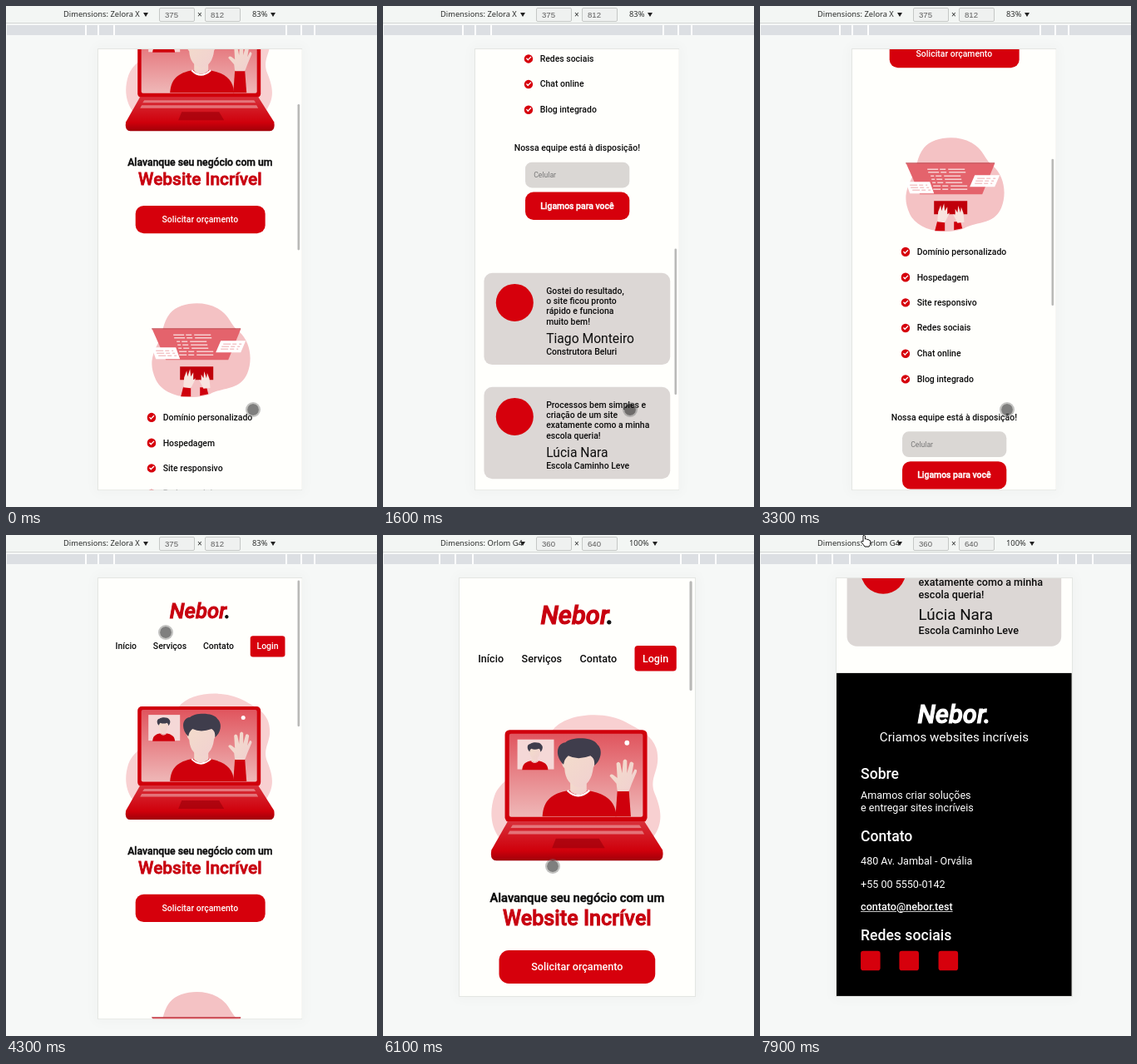
Write an HTML page that moves like this. It is 446 by 602 pixels and loops after 8 s.

```html
<!DOCTYPE html>
<html lang="pt">
<head>
<meta charset="utf-8">
<title>Nebor</title>
<style>
html, body { margin: 0; width: 100%; height: 100%; overflow: hidden; }
body { --red: #d6000c; --w: 375px; --vh: 811px; --k: .6525; --x: 110.8px; --head: 0px; --mid: 0px; --low: 0px;
  position: relative; background: #f6f8f7; font-family: Roboto, sans-serif; }
body.small { --w: 360px; --vh: 639px; --k: .7855; --x: 92px; --head: -3px; --mid: -13px; --low: -20px; }
p { margin: 0; }

.bar { position: absolute; left: 0; top: 0; width: 100%; height: 20px; background: #f3f6f4; border-bottom: 1px solid #d3d6d4;
  font: 9.3px/20px "Noto Sans", sans-serif; color: #2b2d2c; }
.bar > * { position: absolute; white-space: nowrap; }
.bar i { top: 8px; border: 3px solid transparent; border-top: 5px solid #222; border-bottom: 0; }
.bar b { top: 2px; width: 35px; height: 15px; padding-left: 6px; border: 1px solid #c5c8c6; border-radius: 2px; background: #eff1f0;
  font: 9.6px/15px "Liberation Sans", sans-serif; color: #5c5c5c; box-sizing: content-box; }
.ruler { position: absolute; left: 1px; right: 0; top: 23px; height: 12px; background: #dcdfe3; }
.ruler i { position: absolute; top: 0; width: 1.6px; height: 12px; background: #fff; }

.phone { position: absolute; left: var(--x); top: 52px; width: var(--w); height: var(--vh); overflow: hidden;
  transform: scale(var(--k)); transform-origin: 0 0; background: #fffffc; }
.frame { position: absolute; left: calc(var(--x) - 1px); top: 51px; width: calc(var(--w) * var(--k)); height: calc(var(--vh) * var(--k));
  border: 1px solid #e4e6e3; box-shadow: 0 0 13px 4px rgba(0,0,0,.025); }
.page { position: absolute; left: 0; top: 0; width: 100%; height: calc(2421px + var(--low)); font-size: 16px; font-weight: 500; color: #0c0c0c; }
.page p { position: absolute; top: calc(var(--y) * 1px); transform: translateY(-50%); white-space: nowrap; line-height: 19px; }
.page svg { position: absolute; left: 0; width: 100%; display: block; }
.group { position: absolute; left: 0; width: 100%; }
.page .mid { left: 0; width: 100%; text-align: center; }
.heavy { -webkit-text-stroke: .036em; }
.logo { font: italic 500 39.5px Roboto, sans-serif; }
.nav { position: absolute; top: 105.5px; left: 1px; right: 1px; height: 39.5px; display: flex; justify-content: space-evenly; align-items: center; }
.nav b { width: 63.5px; line-height: 39.5px; border-radius: 5px; background: var(--red); color: #fff; font-weight: 500; text-align: center; }
.btn { position: absolute; left: 50%; transform: translateX(-50%); height: 51px; border-radius: 15px; background: var(--red); color: #fff;
  line-height: 51px; text-align: center; }
.list { position: absolute; left: calc(50% - 98px); }
.list p { left: 29.5px; }
.list p::before { content: ""; position: absolute; left: -29.5px; top: 1.5px; width: 16.5px; height: 16.5px; border-radius: 50%; background: var(--red); }
.list p::after { content: ""; position: absolute; left: -25px; top: 6px; width: 6.5px; height: 3px; border: solid #fff; border-width: 0 0 2px 2px; transform: rotate(-45deg); }
.field { position: absolute; top: 1303px; left: calc(50% - 96px); width: 176px; height: 47px; padding-left: 16px; border-radius: 12px;
  background: #dad7d4; color: #777; font: 13.3px/47px Roboto, sans-serif; }

.card { position: absolute; left: 16px; right: 16px; height: 169px; border-radius: 15px; background: #dcd7d5; }
.card::before { content: ""; position: absolute; left: 6.4%; top: 19.5px; width: 69px; height: 69px; border-radius: 50%; background: var(--red); }
.card p { left: 33.4%; }
.card .who { font-size: 24px; font-weight: 400; }
.foot { position: absolute; bottom: 0; width: 100%; height: 494px; background: #000; color: #fff; }
.foot p:not(.mid) { left: 37px; }
.foot .h { font-size: 22.4px; }
.foot .n { font-weight: 400; }
.foot i { position: absolute; top: 425px; width: 30px; height: 30px; background: var(--red); border-radius: 4px; }
.thumb { position: absolute; right: 4.5px; width: 3.4px; border-radius: 2px; background: rgba(128,128,128,.55); }

.menu { position: absolute; left: 64px; top: 18px; width: 140px; height: 331px; background: #fff; box-shadow: 0 0 0 .7px #bbb, 0 2px 4px rgba(0,0,0,.2);
  font: 9.3px/18.4px "Noto Sans", sans-serif; color: #2b2d2c; }
.menu div { padding-left: 8px; height: 18.4px; }
.menu .on { background: #dfe2e6; }
.cur { position: absolute; left: 0; top: 0; width: 0; height: 0; }
.cur > * { position: absolute; }
.dot { left: -9px; top: -9px; width: 14px; height: 14px; border: 2px solid rgba(120,120,120,.45); border-radius: 50%; background: rgba(0,0,0,.5); background-clip: padding-box; }
.cur svg { left: -7px; top: -4px; fill: #fff; stroke: #111; stroke-linejoin: round; }
</style>
</head>
<body>
<div class="bar">
  <span id="dev" style="left:69px"></span><i style="left:165px"></i>
  <b id="bw" style="left:184px"></b><span style="left:230px;font-size:10px">×</span><b id="bh" style="left:239px"></b>
  <span id="zoom" style="left:296px"></span><i id="za"></i>
</div>
<div class="ruler" id="ruler"></div>
<div class="frame"></div>

<div class="phone">
  <div class="page" id="page">
    <div class="group" style="top:var(--head)">
      <p class="mid logo heavy" style="--y:60;color:#c8000f">Nebor<span style="color:#111">.</span></p>
      <div class="nav"><span>Início</span><span>Serviços</span><span>Contato</span><b>Login</b></div>
      <svg style="top:204px" viewBox="110.8 185 244.7 160">
        <defs>
          <linearGradient id="scr" x2="0" y2="1"><stop stop-color="#e0555e"/><stop offset="1" stop-color="#efb8b8"/></linearGradient>
          <linearGradient id="base" x2="0" y2="1"><stop stop-color="#d8303a"/><stop offset=".75" stop-color="#cf000b"/><stop offset="1" stop-color="#a00009"/></linearGradient>
          <linearGradient id="skin" x2="1" y2="1"><stop stop-color="#f3dccb"/><stop offset="1" stop-color="#f1d0d0"/></linearGradient>
          <g id="man">
            <path fill="#cf000c" d="M197 296C198 279 207 272 224 269H244C262 272 273 279 274 296Z"/>
            <path fill="url(#skin)" d="M226 258H243V270Q234 277 226 270Z"/>
            <path fill="none" stroke="#fff" stroke-width="2" d="M223 269Q234 280 246 269"/>
            <path fill="url(#skin)" d="M219 232H250Q254 240 250 245Q248 263 235 266Q221 263 220 246Q215 241 219 232Z"/>
            <path fill="#3f3d4c" d="M219 242C210 234 211 220 221 219C227 213 250 213 254 221C261 227 257 239 251 243Q252 236 247 233Q234 238 224 233Q220 236 219 242Z"/>
          </g>
        </defs>
        <path fill="#f8d0d1" d="M207 207C221 188 262 186 284 198C303 208 317 215 317 236C317 250 309 256 313 270C319 285 325 300 312 318H152C143 306 142 290 147 275C153 258 171 254 179 236C187 220 194 218 207 207Z"/>
        <rect x="158" y="206" width="148" height="96" rx="5" fill="#d0000b"/>
        <rect x="162.500" y="210" width="139" height="86.500" rx="2" fill="url(#scr)"/>
        <use href="#man"/>
        <path fill="#cf000c" d="M273 296L275 269H287L289 296Z"/>
        <path fill="url(#skin)" d="M275 270L274 262L267 254Q268 251 271 253L275 256L274 241Q276 238 278 241L280 251L281 238Q283 235 285 238V251L288 240Q290 238 292 241L290 253L293 247Q296 247 295 250L290 262L287 270Z"/>
        <circle cx="285" cy="219.500" r="2.500" fill="#fff"/>
        <rect x="171" y="216" width="38" height="31" fill="#f5d8d7"/>
        <use href="#man" transform="translate(107 144) scale(.35)"/>
        <path fill="url(#base)" d="M161 301H303L322 331Q324 342 317 342H149Q142 342 144 331Z"/>
        <path fill="#eda0a4" opacity=".65" d="M166 305H298L300 308H164ZM163 311H301L303 314.500H161Z"/>
        <path fill="#a1000a" opacity=".7" d="M211 319H256L262 329H207Z"/>
      </svg>
    </div>

    <div class="group" style="top:var(--mid)">
      <p class="mid heavy" style="--y:503;font-size:18.72px">Alavanque seu negócio com um</p>
      <p class="mid heavy" style="--y:533;font-size:32px;color:#c8000f">Website Incrível</p>
      <div class="btn" style="top:582px;width:239px">Solicitar orçamento</div>
      <svg style="top:751px" viewBox="110.8 350 244.7 125">
        <path fill="#f4c2c4" d="M197 369C208 356 236 353 254 363C270 372 268 382 280 391C293 402 297 424 290 441C281 462 262 457 245 466C225 474 190 470 180 449C171 430 176 418 183 404C189 392 188 380 197 369Z"/>
        <path fill="#e4636c" d="M175.500 388H282L267 425H192Z"/>
        <path stroke="#b8303a" d="M175 387.700H282"/>
        <g stroke="#f7cfd0" stroke-width="1.500" fill="none" stroke-dasharray="13 2 7 3 20 40">
          <path d="M201 395H255M202 398.500H250"/><path stroke-dashoffset="9" d="M205 403H248M206 407H258M207 411H245"/>
          <path stroke-dashoffset="4" d="M208 415H250M208 419H256"/>
        </g>
        <path fill="#fff" d="M175 410H204L209 424H180ZM258 402H288L282 416H252Z"/>
        <path stroke="#eda9ac" stroke-dasharray="9 2 5 3" d="M180 414H201M181 417H203M183 420H205M261 406H283M259 409H281M258 412H279"/>
        <path fill="#c0000b" d="M209 433H249V449H209Z"/>
        <path fill="#cf000c" d="M210 469L213 457H222L222 469ZM233 468L233 458H241L243 466Z"/>
        <path id="palm" fill="#f8e4df" d="M213 458L214 446L217 438L218 445L221 436L222 445L225 440L225 449L228 447L222 459Z"/>
        <use href="#palm" transform="matrix(-.9 0 0 .9 437 46.500)"/>
      </svg>
    </div>

    <div class="group" style="top:var(--low)">
      <div class="list" id="list"></div>
      <p class="mid" style="--y:1277">Nossa equipe está à disposição!</p>
      <div class="field">Celular</div>
      <div class="btn heavy" style="top:1358px;width:192px">Ligamos para você</div>
    </div>

    <div class="card" style="bottom:745px">
      <p style="--y:60.500">Gostei do resultado,<br>o site ficou pronto<br>rápido e funciona<br>muito bem!</p>
      <p class="who" style="--y:121">Tiago Monteiro</p><p style="--y:144.500">Construtora Beluri</p>
    </div>
    <div class="card" style="bottom:535px">
      <p style="--y:60.500">Processos bem simples e<br>criação de um site<br>exatamente como a minha<br>escola queria!</p>
      <p class="who" style="--y:121">Lúcia Nara</p><p style="--y:144.500">Escola Caminho Leve</p>
    </div>
    <div class="foot">
      <p class="mid logo heavy" style="--y:62.500">Nebor.</p>
      <p class="mid n" style="--y:98;font-size:19.2px">Criamos websites incríveis</p>
      <p class="h" style="--y:154">Sobre</p>
      <p class="n" style="--y:196">Amamos criar soluções<br>e entregar sites incríveis</p>
      <p class="h" style="--y:249.500">Contato</p>
      <p class="n" style="--y:287.500">480 Av. Jambal - Orvália</p>
      <p class="n" style="--y:322.500">+55 00 5550-0142</p>
      <p style="--y:357.500;text-decoration:underline">contato@nebor.test</p>
      <p class="h" style="--y:400.500">Redes sociais</p>
      <i style="left:37px"></i><i style="left:96px"></i><i style="left:156px"></i>
    </div>
  </div>
  <div class="thumb" id="thumb"></div>
</div>

<div class="menu" id="menu"></div>
<div class="cur" id="cur">
  <div class="dot" id="dot"></div>
  <svg id="hand" width="14" height="16" viewBox="0 0 14 16"><path d="M4 9V2Q5.200 0 6.400 2V6Q8 5 8.700 6.500Q10.300 5.700 11 7.200Q13 7 12.800 9.500Q13 13 11 15H6Q4 12 1.500 9.500Q1.500 7.500 4 9Z"/></svg>
  <svg id="arrow" width="12" height="16" viewBox="-7 -4 12 16" style="overflow:visible"><path d="M0 0V11L2.600 8.600L4.400 12L6 11.200L4.400 7.800H8Z"/></svg>
</div>

<script>
const $ = id => document.getElementById(id);
const LOOP = 8000, STEP = 100, SWITCH = 5800;

const devices = [
  { name: 'Zelora X', w: 375, h: 812, view: 811, zoom: '83%', arrow: 318, page: 2421, ticks: [96, 111, 130, 337, 355, 371] },
  { name: 'Orlom G4', w: 360, h: 640, view: 639, zoom: '100%', arrow: 324, page: 2401, ticks: [68, 87, 108, 358, 380, 400] }
];

// Each key is [time, value, ...]
const scroll = [[0, 294], [300, 60], [500, 0], [700, 20], [1000, 245], [1500, 960], [1900, 1500], [2100, 1610], [2550, 1610],
  [2700, 1480], [3300, 599], [3700, 90], [3900, 0], [6300, 0], [6500, 120], [7000, 1250], [7300, 1762]];
const pointer = [[3900, 297, 485], [4300, 192, 117], [4700, 126, 10], [5200, 126, 12], [5600, 128, 336], [5700, 128, 336],
  [6100, 204, 398], [7500, 204, 398], [7900, 127, 3]];
const barFade = [[4500, 1], [4800, 0], [5700, 0], [5800, 1], [7450, 1], [7700, 0]];

function at(keys, t, i = 1) {
  const n = keys.findIndex(k => k[0] > t);
  if (n === 0) return keys[0][i];
  if (n < 0) return keys[keys.length - 1][i];
  const a = keys[n - 1], b = keys[n];
  return a[i] + (b[i] - a[i]) * (t - a[0]) / (b[0] - a[0]);
}

$('list').innerHTML = ['Domínio personalizado', 'Hospedagem', 'Site responsivo', 'Redes sociais', 'Chat online', 'Blog integrado']
  .map((s, i) => `<p style="--y:${971.6 + i * 46.9}">${s}</p>`).join('');

const sizes = ['Mini', 'Plus', 'Wide', 'Tall'];
const names = ['Responsive', ...Array.from({ length: 14 }, (_, i) => `Device ${i + 1} ${sizes[i % 4]}`), ...devices.map(d => d.name), 'Edit…'];
$('menu').innerHTML = names.map(s => `<div>${s}</div>`).join('');
const rows = [...$('menu').children];

let shown;
function setDevice(d) {
  if (d === shown) return;
  shown = d;
  document.body.classList.toggle('small', d === devices[1]);
  $('dev').textContent = 'Dimensions: ' + d.name;
  $('bw').textContent = d.w;
  $('bh').textContent = d.h;
  $('zoom').textContent = d.zoom;
  $('za').style.left = d.arrow + 'px';
  $('ruler').innerHTML = d.ticks.map(x => `<i style="left:${x - 2}px"></i>`).join('');
}

const show = (id, on) => { $(id).style.display = on ? '' : 'none'; };

function draw(t) {
  const d = devices[t < SWITCH ? 0 : 1];
  setDevice(d);

  const y = at(scroll, t), track = d.view - 7, size = track * d.view / d.page;
  $('page').style.transform = `translateY(${-y}px)`;
  $('thumb').style.height = size + 'px';
  $('thumb').style.top = 3.5 + (track - size) * y / (d.page - d.view) + 'px';
  $('thumb').style.opacity = at(barFade, t);

  const x = at(pointer, t), py = at(pointer, t, 2), open = t >= 4900 && t < SWITCH;
  $('cur').style.transform = `translate(${x}px,${py}px)`;
  show('menu', open);
  show('dot', !open && py > 52);
  show('hand', !open && py <= 52);
  show('arrow', open);
  const row = Math.max(0, Math.floor((py - 18) / 18.4) - 1);
  rows.forEach((r, i) => r.classList.toggle('on', i === row));
}

const start = performance.now();
function tick() {
  const t = (performance.now() - start) % LOOP;
  draw(Math.floor(t / STEP) * STEP);
  requestAnimationFrame(tick);
}
tick();
</script>
</body>
</html>
```
